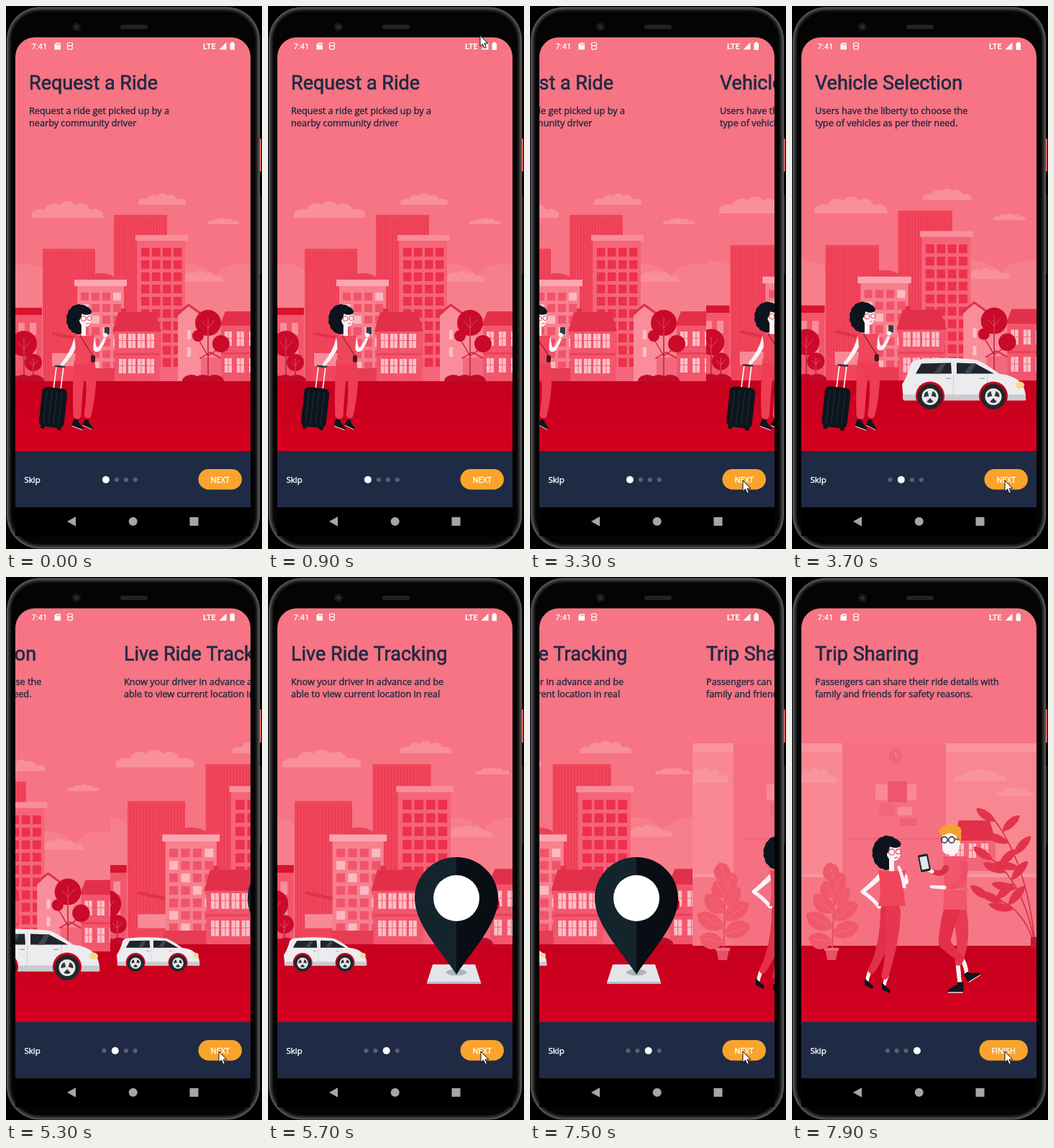
An HTML page with a canvas that plays this animation: 356x754 px, repeating every 8 s.

```html
<!DOCTYPE html>
<html lang="en">
<head>
<meta charset="utf-8">
<title>Onboarding</title>
<style>
html, body { margin: 0; width: 100%; height: 100%; overflow: hidden; background: #000; }
canvas { display: block; width: 356px; height: 754px; }
</style>
</head>
<body>
<canvas id="stage"></canvas>
<script>
const cv = document.getElementById('stage');
const g = cv.getContext('2d');
const dpr = window.devicePixelRatio || 1;
cv.width = 356 * dpr;
cv.height = 754 * dpr;

const LOOP = 8000, SLIDE = 500, SLIDES = [3120, 5020, 7300];
const LEFT = 13, TOP = 43.5, PAGE_W = 327;
const INK = '#1f2a44', DARK = '#0c151d', WHITE = '#fff', SKIN = '#fdf3f5', GREY = '#a6a6a6';
const SKY = '#f67483', CLOUD = '#f98f9b', HAZE = '#f77f8c';
const RED = '#f0465c', DEEP = '#e2304a', ROSE = '#f4647a', PALE = '#fba5af', BRICK = '#f2566c';
const SANS = '"Open Sans", "Noto Sans", sans-serif', ROBOTO = 'Roboto, sans-serif';

// ---- drawing helpers ----
function rect(c, x, y, w, h, r = 0) {
  g.fillStyle = c;
  g.beginPath();
  g.roundRect(x, y, w, h, r);
  g.fill();
}
function oval(c, x, y, rx, ry = rx, a = 0) {
  g.fillStyle = c;
  g.beginPath();
  g.ellipse(x, y, rx, ry, a, 0, 7);
  g.fill();
}
function poly(c, ...p) {
  g.fillStyle = c;
  g.beginPath();
  for (let i = 0; i < p.length; i += 2) g.lineTo(p[i], p[i + 1]);
  g.fill();
}
function line(c, w, ...p) {
  g.strokeStyle = c;
  g.lineWidth = w;
  g.lineCap = g.lineJoin = 'round';
  g.beginPath();
  for (let i = 0; i < p.length; i += 2) g.lineTo(p[i], p[i + 1]);
  g.stroke();
}
function ring(c, w, x, y, r) {
  g.strokeStyle = c;
  g.lineWidth = w;
  g.beginPath();
  g.arc(x, y, r, 0, 7);
  g.stroke();
}
function text(s, x, y, font, c, bold = 0, align = 'left') {
  g.font = font;
  g.textAlign = align;
  g.fillStyle = g.strokeStyle = c;
  g.lineWidth = bold;
  g.fillText(s, x, y);
  if (bold) g.strokeText(s, x, y);
}
function place(x, y, fn, { a = 0, sx = 1, sy = sx } = {}) {
  g.save();
  g.translate(x, y);
  g.rotate(a);
  g.scale(sx, sy);
  fn();
  g.restore();
}
const bend = (a, b, c, t) => (1 - t) ** 2 * a + 2 * t * (1 - t) * b + t * t * c;
// tapered stroke along a quadratic curve
function limb(c, w0, w1, x0, y0, cx, cy, x1, y1) {
  for (let t = 0; t <= 1; t += .04)
    oval(c, bend(x0, cx, x1, t), bend(y0, cy, y1, t), (w0 + (w1 - w0) * t) / 2);
}
function leaf(c, x, y, len, a, w) {
  place(x, y, () => {
    g.fillStyle = c;
    g.beginPath();
    g.moveTo(0, 0);
    g.bezierCurveTo(len * .25, -w, len * .8, -w, len, 0);
    g.bezierCurveTo(len * .8, w * .8, len * .25, w * .8, 0, 0);
    g.fill();
  }, { a });
}
function cloud(x, y, w, h, c = CLOUD) {
  g.save();
  g.beginPath();
  g.rect(x, y, w, h);
  g.clip();
  for (let i = 0; i < 5; i++) {
    const u = .12 + i * .19, lift = Math.sin(Math.PI * u);
    oval(c, x + w * u, y + h * (1.15 - .5 * lift), w * .14, h * (.4 + .25 * lift));
  }
  g.restore();
}
function grid(x, y, cols, rows, dx, dy, cell) {
  for (let r = 0; r < rows; r++)
    for (let c = 0; c < cols; c++) cell(x + c * dx, y + r * dy, c, r);
}

// ---- city ----
function tower(x, y, w) {
  rect(RED, x, y, w, 521 - y);
  for (let i = 3; i < w; i += 4) rect('#ec3a52', x + i, y + 4, 1.2, 517 - y);
}
function pane(x, y) {
  rect('#fcc0c8', x, y, 10, 20);
  rect(ROSE, x + 4.5, y, 1, 20);
  rect(ROSE, x, y + 9, 10, 1);
}
function roof(x, w, y, h) {
  poly(DEEP, x + 6, y, x + w - 6, y, x + w + 2, y + h, x - 2, y + h);
}
function tree(x, y, r) {
  line('#b8203a', 1.5, x, y, x, 521);
  oval('#c90a2b', x, y, r);
  line('#ea5068', .9, x, y + r, x, y - r * .4);
  line('#ea5068', .8, x - r * .45, y - r * .1, x, y + r * .4, x + r * .5, y - r * .2);
}
function city() {
  for (const x of [25, 80, 255, 325]) oval(HAZE, x, 410, 48, 52);
  rect(HAZE, -40, 405, 440, 116);
  cloud(36, 271, 99, 23);
  cloud(184, 260, 66, 16);
  cloud(280, 294, 44, 9);
  cloud(238, 368, 64, 15);

  tower(51, 337, 73);
  tower(150, 290, 74);
  rect(ROSE, 182, 324, 67, 197);
  rect('#f98d99', 180, 318, 73, 8);
  grid(188, 336, 4, 10, 15, 17, (x, y) => rect('#ed304b', x, y, 11.5, 12));

  rect(BRICK, -30, 429, 80, 92);
  rect('#d8152f', -30, 419, 80, 10);
  grid(17, 440, 2, 2, 16, 30, (x, y) => rect('#f98d99', x, y, 9, 17));
  line(DEEP, 4, 66, 455, 100, 462);
  rect('#f88a97', 64, 482, 36, 18);
  rect(RED, 60, 500, 42, 21);

  oval('#ea4059', 132, 382, 21, 11);
  rect('#f77f8e', 99, 388, 65, 115);
  rect(PALE, 95, 380, 73, 9);
  grid(104, 398, 4, 7, 15, 16, (x, y, c, r) =>
    rect((c * 3 + r * 5) % 4 == 1 ? '#fcb9c1' : '#f0546a', x, y, 11, 11));
  rect('#e63c54', 97, 503, 69, 18);

  rect(BRICK, 151, 448, 63, 73);
  roof(150, 64, 425, 27);
  rect(DEEP, 160, 420, 7, 8);
  grid(157, 455, 4, 2, 13, 35, pane);
  rect('#e8435a', 151, 482, 63, 3);

  poly('#f98d99', 239, 430, 254, 417, 289, 444, 289, 521, 239, 521);
  line(DEEP, 3, 238, 428, 254, 415, 290, 441);
  grid(252, 450, 1, 2, 0, 24, (x, y) => rect('#fcc0c8', x, y, 5, 13));
  rect('#f3687c', 271, 488, 28, 33);
  line(DEEP, 2, 270, 489, 284, 481, 299, 489);
  rect(BRICK, 299, 441, 85, 80);
  roof(299, 90, 424, 20);
  grid(304, 452, 4, 2, 17, 37, pane);
  rect('#e8435a', 299, 481, 85, 3);

  tree(25, 469, 18);
  tree(38, 495, 12);
  line('#b8203a', 1.3, 267, 462, 281, 486, 298, 474);
  tree(281, 440, 18);
  oval('#c90a2b', 267, 458, 8);
  oval('#c90a2b', 299, 469, 12);
  for (let i = 0; i < 3; i++) for (const x of [8, 258]) oval('#c00a2a', x + i * 16, 521, 13, 9);
}
function ground(y) {
  const f = g.createLinearGradient(0, y, 0, 618);
  f.addColorStop(0, '#c6001e');
  f.addColorStop(1, '#d50020');
  rect(f, 0, y, 356, 620 - y);
}

// ---- people ----
function hair(x, y, s) {
  place(x, y, () => {
    oval(DARK, 0, 0, 13, 16);
    for (let i = 0; i < 9; i++) {
      const a = -1.2 - i * .43;
      oval(DARK, 11.5 * Math.cos(a), 14.5 * Math.sin(a), 7.3);
    }
    limb(SKIN, 6, 6, 6, 8, 6, 16, 6, 24);
    oval(SKIN, 8.5, -1, 9, 11.5);
    oval(DARK, 7, -13, 11, 6, .3);
    oval(DARK, -1, -5, 4, 9, .3);
    ring('#d93850', 1, 6, -1, 3.7);
    ring('#d93850', 1, 14.5, -1.5, 3.2);
    line('#d93850', 1, 10, 6.5, 13.5, 5.5);
  }, { sx: s });
}
function torso(c, x, y, w, h, pinch) {
  g.fillStyle = c;
  g.beginPath();
  g.moveTo(x - w / 2, y + 2);
  g.quadraticCurveTo(x, y + 8 * pinch, x + w / 2, y + 2);
  g.quadraticCurveTo(x + w / 2 - 9 * pinch, y + h * .6, x + w / 2, y + h);
  g.lineTo(x - w / 2, y + h);
  g.quadraticCurveTo(x - w / 2 + 9 * pinch, y + h * .6, x - w / 2, y + 2);
  g.fill();
}
// ankle at x, y; negative length points the toe left
function shoe(x, y, len, a) {
  place(x, y, () => {
    rect(DARK, -4, -4, 8, 9, 2);
    poly(DARK, -4, 2, 4, -1, 16, 6, 16, 9, -4, 9);
    line(WHITE, 1, -3, 9, 15, 9);
  }, { a, sx: len / 20, sy: Math.abs(len) / 20 });
}
function traveller() {
  for (const x of [66, 76]) line(WHITE, 1.6, x, 533, x + 4, 501);
  line('#27323a', 2.5, 69, 500, 81, 501);
  place(65, 558, () => {
    rect(DARK, -17, -28, 35, 55, 7);
    for (let i = -11; i < 17; i += 7) rect('#22303a', i, -23, 1, 45);
    for (const x of [-14, 9]) rect(DARK, x, 25, 6, 5, 2);
  }, { a: .11 });

  shoe(97, 577, 17, .35);
  shoe(112, 577, 15, .45);
  limb('#ee3d55', 17, 11, 103, 496, 99, 535, 99, 571);
  limb('#ee3d55', 17, 10, 115, 496, 122, 525, 113, 571);
  limb(SKIN, 7, 4.5, 98, 462, 94, 480, 77, 499);
  limb(SKIN, 6, 4, 121, 462, 124, 494, 138, 460);
  hair(102, 435, .97);
  torso(RED, 109, 455, 29, 42, .5);
  rect('#303b44', 137, 446, 7, 10, 1);
  oval(SKIN, 138, 457, 3);
  line('#5a1a2a', 1, 103, 458, 121, 486);
  rect('#4a1524', 118, 485, 6, 10, 2);
}
function friend() {
  for (const [x, y] of [[104, 562], [128, 568]]) {
    limb(SKIN, 5, 4, x + 4, y - 14, x + 1, y - 6, x, y);
    poly(DARK, x - 3, y - 5, x + 2, y, x + 9, y + 6, x + 8, y + 10, x - 3, y + 5);
  }
  limb(DEEP, 22, 9, 134, 464, 130, 515, 109, 549);
  limb('#e63650', 22, 9, 140, 464, 142, 510, 128, 558);
  limb(SKIN, 7, 5, 124, 414, 110, 428, 98, 437);
  limb(SKIN, 5, 5, 98, 437, 112, 446, 122, 459);
  limb(SKIN, 7, 4, 157, 416, 162, 436, 150, 405);
  hair(132, 383, 1.1);
  torso(RED, 139, 405, 38, 52, .6);
  limb(SKIN, 5, 4, 156, 430, 154, 415, 148, 402);
}
function sharer() {
  limb(SKIN, 6, 5, 236, 530, 242, 540, 243, 551);
  limb(SKIN, 6, 5, 231, 540, 232, 555, 234, 568);
  shoe(244, 553, 20, -.55);
  shoe(234, 567, -22, 0);
  limb('#e83a53', 22, 10, 232, 464, 242, 505, 231, 537);
  limb(DEEP, 22, 16, 222, 464, 214, 488, 212, 508);
  limb(DEEP, 16, 9, 212, 508, 222, 520, 236, 531);
  limb(SKIN, 8, 8, 223, 380, 223, 386, 223, 392);
  torso(BRICK, 227, 386, 33, 76, .1);
  rect('#f4667a', 212, 432, 33, 3);
  limb('#d8324a', 8, 6, 214, 404, 208, 416, 194, 408);
  limb('#ee4f66', 10, 7, 239, 398, 244, 432, 214, 430);
  limb(SKIN, 5, 4, 212, 431, 202, 431, 193, 430);
  limb(SKIN, 5, 4, 195, 409, 191, 407, 187, 405);
  place(184, 397, () => {
    rect('#1b242b', -7, -12, 14, 24, 2);
    rect('#dfe7ec', -5, -9, 10, 18);
  }, { a: -.2 });
  rect(SKIN, 209, 352, 23, 33, 8);
  limb('#f7a032', 11, 13, 210, 353, 220, 346, 230, 353);
  oval('#f7a032', 232, 361, 3.5, 8);
  oval(SKIN, 231, 370, 3, 4);
  for (const x of [212, 222]) ring('#1f2830', 1.4, x, 365, 4.2);
  line('#1f2830', 1.2, 226, 364, 232, 364);
}

// ---- car and pin ----
function wheel(x) {
  oval('#c8001e', x, 53, 20);
  oval('#24262b', x, 54, 17.5);
  oval('#e8e8ea', x, 54, 11.5);
  for (let i = 0; i < 3; i++) {
    const a = Math.PI / 2 + i * Math.PI * 2 / 3;
    g.fillStyle = '#34373c';
    g.beginPath();
    g.moveTo(x + 2 * Math.cos(a), 54 + 2 * Math.sin(a));
    g.arc(x, 54, 8.5, a - .6, a + .6);
    g.fill();
  }
}
function car() {
  g.fillStyle = '#ececee';
  g.beginPath();
  g.moveTo(2, 59);
  g.lineTo(0, 37);
  g.quadraticCurveTo(8, 25, 12, 9);
  g.quadraticCurveTo(14, 3, 27, 2);
  g.quadraticCurveTo(70, -2, 104, 3);
  g.quadraticCurveTo(118, 9, 135, 22);
  g.quadraticCurveTo(174, 26, 172, 59);
  g.fill();
  rect('#c9cbd0', 1, 51, 171, 8, 3);
  poly('#20252b', 19, 22, 27, 8, 68, 7, 69, 22);
  poly('#20252b', 76, 22, 76, 7, 102, 8, 128, 22);
  for (const x of [44, 86]) poly('#3d454d', x, 22, x + 10, 8, x + 17, 8, x + 9, 22);
  for (const x of [72, 119]) {
    line('#c9cbd0', .9, x, 23, x - 1, 51);
    rect('#aaadb3', x - 11, 28, 7, 1.6);
  }
  oval('#f7d98a', 164, 38, 6, 5);
  wheel(39);
  wheel(127);
}
function pin() {
  poly('#e3e6e9', 229, 538, 288, 538, 296, 563, 221, 563);
  rect('#b9bec4', 221, 562, 75, 3);
  oval('#aeb4ba', 262, 549, 14, 4.5);
  for (const d of [-58, 58]) {
    g.fillStyle = d < 0 ? '#13242d' : '#080e13';
    g.beginPath();
    g.moveTo(262, 389);
    g.bezierCurveTo(262 + d * .56, 389, 262 + d, 415, 262 + d, 446);
    g.bezierCurveTo(262 + d, 482, 262 + d * .38, 518, 262, 552);
    g.fill();
  }
  oval(WHITE, 262, 446, 32);
}

// ---- living room ----
function bush() {
  line('#e8485e', 2, 56, 518, 60, 400);
  for (let i = 0; i < 9; i++) {
    const side = i % 2 ? 1 : -1, x = 56 + i * .5, y = 508 - i * 10.5;
    const a = -Math.PI / 2 + side * (1.35 - i * .13), len = 34 + 8 * Math.sin(i * .7);
    leaf('#f0586c', x, y, len, a, 17);
    line('#f4788a', .8, x, y, x + len * .8 * Math.cos(a), y + len * .8 * Math.sin(a));
  }
  poly('#ea5066', 46, 516, 64, 516, 61, 532, 49, 532);
  rect('#f06a7d', 45, 515, 20, 4);
}
function palm() {
  for (let k = 0; k < 3; k++) {
    const tx = 282 - k * 4, ty = 338 + k * 54, cx = 328 - k * 5, cy = 400 + k * 25;
    for (let t = 0; t < 1; t += .04)
      line('#d92b46', 1.5, bend(338, cx, tx, t), bend(512, cy, ty, t),
        bend(338, cx, tx, t + .04), bend(512, cy, ty, t + .04));
    for (let i = 0; i < 5; i++) {
      const t = .55 + i * .11, a = i % 2 ? -.9 + i * .05 : -2.95 + i * .1;
      leaf('#e2334c', bend(338, cx, tx, t), bend(512, cy, ty, t), 36 - i, a, 8.5);
    }
  }
  rect('#c31632', 332, 500, 24, 16);
}
function room() {
  rect('#f67785', 0, 231, 356, 281);
  rect('#f57081', 70, 231, 144, 281);
  for (const [x, w] of [[0, 70], [214, 142]]) {
    rect('#f88792', x, 243, w, 172);
    rect('#f9949f', x, 231, w, 12);
    rect('#f9949f', x, 412, w, 5);
  }
  cloud(2, 264, 60, 22, '#f9949f');
  cloud(226, 267, 72, 16, '#f9949f');
  cloud(285, 292, 50, 12, '#f9949f');
  rect('#f2657a', 224, 364, 59, 44);
  roof(226, 55, 338, 28);
  grid(229, 370, 3, 1, 17, 0, pane);
  rect('#f06076', 80, 363, 134, 1.2);
  oval('#f2657a', 144, 249, 10);
  line('#f88f9b', 1, 144, 243, 144, 249, 148, 251);
  rect('#f88a97', 116, 288, 57, 22);
  rect('#f0566c', 133, 284, 27, 29);
  rect('#f2677c', 121, 314, 22, 18);
  rect('#f88a97', 147, 319, 20, 12);
  rect('#f06076', 150, 335, 24, 10);
  ground(512);
  bush();
  palm();
}

// ---- pages ----
const near = fn => place(-5.6, -12.5, fn, { sx: 1.02, sy: 1.022 });
const PAGES = [
  ['Request a Ride', 'Request a ride get picked up by a', 'nearby community driver', () => {
    city();
    ground(521);
    traveller();
  }],
  ['Vehicle Selection', 'Users have the liberty to choose the', 'type of vehicles as per their need.', () => {
    near(city);
    ground(520);
    near(traveller);
    place(153, 488.5, car);
  }],
  ['Live Ride Tracking', 'Know your driver in advance and be', 'able to view current location in real', () => {
    place(-18.9, -54.7, city, { sx: 1.096, sy: 1.085 });
    ground(510);
    place(22, 500, car, { sx: .67 });
    pin();
  }],
  ['Trip Sharing', 'Passengers can share their ride details with', 'family and friends for safety reasons.', () => {
    room();
    friend();
    sharer();
  }]
];
function page(i, dx) {
  const [title, a, b, art] = PAGES[i];
  place(dx, 0, () => {
    g.save();
    g.beginPath();
    g.rect(LEFT, 43, PAGE_W, 576);
    g.clip();
    art();
    g.restore();
    text(title, 32, 116, '27px ' + ROBOTO, INK, .65);
    text(a, 32, 150, '12.7px ' + SANS, INK, .4);
    text(b, 32, 167, '12.7px ' + SANS, INK, .4);
  });
}

// ---- phone ----
function phone() {
  rect('#000', 0, 0, 356, 754);
  rect('#d9605f', 352, 184, 3, 46, 1);
  rect('#1d1d1d', 352, 262, 3, 110, 1);
  for (let i = 0; i < 8; i++) {
    const v = Math.round(88 * (1 - i / 7) ** 1.3) + 4;
    rect(`rgb(${v},${v},${v})`, 1 + i, 1.5 + i, 352 - 2 * i, 752 - 2 * i, 46 - i);
  }
  rect('#222', 159, 26, 38, 6, 3);
  oval('#14181d', 98, 29, 6);
  oval('#27303a', 98, 29, 2.5);
}
function statusBar() {
  const font = '500 11px ' + ROBOTO;
  text('7:41', 35.5, 59.5, font, WHITE);
  poly(WHITE, 70, 51, 76, 51, 76, 60.5, 67.5, 60.5, 67.5, 53.5);
  for (let i = 0; i < 3; i++) rect(SKY, 70.5 + i * 1.9, 52, 1, 2.4);
  g.strokeStyle = WHITE;
  g.lineWidth = 1.2;
  g.beginPath();
  g.roundRect(85.5, 51, 7, 4.2, 1.5);
  g.roundRect(85.5, 55.2, 7, 5, 2.5);
  g.stroke();
  text('LTE', 274, 59.5, font, WHITE, .2);
  poly(WHITE, 296.5, 60.5, 306.5, 60.5, 306.5, 50.5);
  rect(WHITE, 311.5, 51.5, 6.5, 9.5, 1);
  rect(WHITE, 313.3, 50, 3, 2);
}
function controls(active) {
  const last = active == 3, left = last ? 260.5 : 267.5;
  rect(INK, 12, 618, 330, 78);
  text('Skip', 25.5, 662, '11.5px ' + SANS, WHITE, .4);
  for (let i = 0; i < 4; i++) {
    const on = i == active;
    const x = 136.5 + 12.9 * i + (on ? 2.4 : i > active ? 4.6 : 0) - (last ? 3.7 : 0);
    oval(on ? WHITE : '#5a6072', x, 657.8, on ? 5 : 3.1);
  }
  rect('#f9a42c', left, 643, 328 - left, 28.5, 14.2);
  text(last ? 'FINISH' : 'NEXT', (left + 328) / 2, 661.5, '10.8px ' + SANS, WHITE, .4, 'center');
  rect('#000', 12, 696, 330, 40);
  poly(GREY, 85, 715.8, 97, 709, 97, 722.5);
  oval(GREY, 176.7, 715.7, 6);
  rect(GREY, 255.5, 709.7, 12, 12);
}
function cursor(x, y) {
  place(x, y, () => {
    const shape = [0, 0, 0, 15, 3.5, 11.8, 6, 17.5, 8.4, 16.4, 6, 11, 10.8, 10.8, 0, 0];
    poly(WHITE, ...shape);
    line('#111', 1, ...shape);
  });
}

// ---- timing ----
const clamp = v => Math.max(0, Math.min(1, v));
const ease = u => (1 - Math.cos(Math.PI * clamp(u))) / 2;
function pointer(t) {
  const enter = clamp((t - 700) / 200), down = ease((t - 900) / 1100), nudge = ease((t - 2600) / 300);
  return [300 - 5 * enter - 5 * down + 6 * nudge, -18 + 59 * enter + 617 * down + nudge];
}
function draw(t) {
  let pos = 0, active = 0;
  for (const s of SLIDES) {
    const u = (t - s) / SLIDE;
    pos += ease(u);
    if (u >= .75) active++;
  }
  g.setTransform(dpr, 0, 0, dpr, 0, 0);
  phone();
  g.save();
  g.beginPath();
  g.roundRect(LEFT, TOP, PAGE_W, 700, [27, 27, 0, 0]);
  g.clip();
  rect(SKY, 12, 43, 330, 580);
  for (let i = Math.floor(pos); i <= Math.ceil(pos); i++) page(i, Math.round((i - pos) * PAGE_W));
  statusBar();
  controls(active);
  g.restore();
  cursor(...pointer(t));
}
const start = performance.now();
function frame() {
  draw((performance.now() - start) % LOOP);
  requestAnimationFrame(frame);
}
frame();
</script>
</body>
</html>
```
